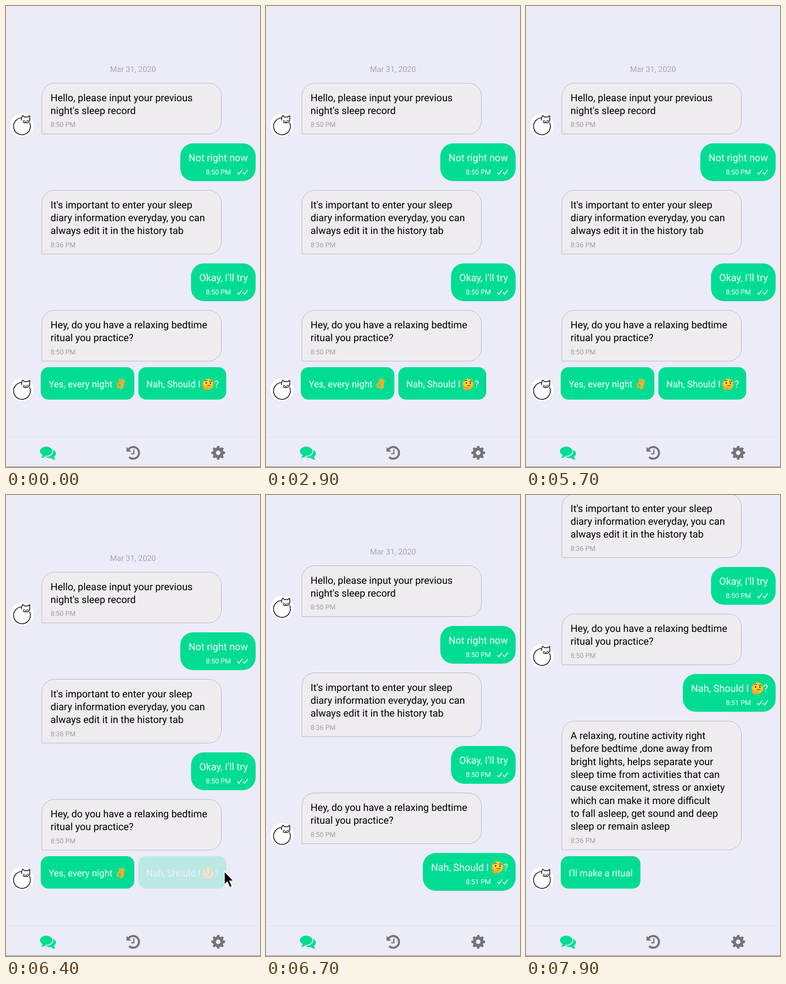
An HTML page that plays this animation: 556x1007 px, repeating every 8000 ms.

```html
<!DOCTYPE html>
<html lang="en">
<head>
<meta charset="utf-8">
<title>Sleep chat</title>
<style>
  html, body { margin: 0; width: 100%; height: 100%; overflow: hidden; background: #ecebf8; }
  svg { display: block; width: 556px; height: 1007px; font-family: Roboto, sans-serif; text-rendering: geometricPrecision; }
  .body { font-size: 21.66px; }
  .time { font-size: 14.9px; }
  .option { font-size: 20.3px; }
  .date { font-size: 17.3px; fill: #a6a5ae; }
  .white { fill: #f8fcff; }
  .grey { fill: #a09fa3; }

  .log, .ask, .sent, .advice, .press, .cursor { animation: 8s step-end infinite; }
  .log { animation-name: log; }
  .ask { animation-name: ask; }
  .sent { animation-name: sent; }
  .advice { animation-name: advice; }
  .press { animation-name: press; }
  .cursor { animation-name: cursor; }

  /* 80% press, 81.25% reply sent, 85% advice arrives */
  @keyframes log {
    0% { transform: translateY(0); }
    81.25% { transform: translateY(-14px); }
    85%, 100% { transform: translateY(-405px); }
  }
  @keyframes ask { 0% { visibility: visible; } 81.25%, 100% { visibility: hidden; } }
  @keyframes sent { 0% { visibility: hidden; } 81.25%, 100% { visibility: visible; } }
  @keyframes advice { 0% { visibility: hidden; } 85%, 100% { visibility: visible; } }
  @keyframes press { 0% { opacity: 1; } 80%, 100% { opacity: .2; } }
  @keyframes cursor { 0% { visibility: hidden; } 80% { visibility: visible; } 81.25%, 100% { visibility: hidden; } }
</style>
</head>
<body>
<svg viewBox="0 0 556 1007">
  <defs>
    <g id="cat">
      <circle r="25.6" fill="#fff"/>
      <g fill="none" stroke="#111" stroke-width="1.7" stroke-linecap="round" stroke-linejoin="round">
        <path d="M-1-15.500A18.400 18.400 0 1 0 16.800-4.500"/>
        <path d="M-1-11C-1-15-.2-18.500 1.500-20.800L5.500-17.300Q9-18 12-17.300L16.700-20.300Q17.800-14 16.800-9.500C15-4.500 7-3.500 2.500-6.500"/>
        <path d="M2.500-9.800q2 1.800 4 .3M10.500-9.500q2.200 1.200 3.800-.5M7.500-7.300l1 .6 1-.8" stroke-width="1.200"/>
      </g>
    </g>
    <radialGradient id="skin" cy=".4">
      <stop offset=".5" stop-color="#fdd835"/>
      <stop offset="1" stop-color="#fbb52a"/>
    </radialGradient>
    <g id="think">
      <circle r="12" fill="url(#skin)"/>
      <g fill="none" stroke="#5b4224" stroke-width="1.500" stroke-linecap="round">
        <path d="M-7.500-7Q-5-9.500-2-7.500M3-6Q6-7.500 8.500-5.500M-1.500 3.500Q2 2 5.500 3.800"/>
      </g>
      <g fill="#48351f">
        <ellipse cx="-4" cy="-2.500" rx="1.500" ry="2"/>
        <ellipse cx="5" cy="-2" rx="1.500" ry="2"/>
      </g>
      <path d="M-10.500 5q1.500-1.500 2.500.5l1.500 2L1 5.800q2 .2 1 1.900L-1.500 9q1 3-3 4-4.500.2-6-3Z" fill="#fba72c" stroke="#e88f1c" stroke-width=".6"/>
    </g>
    <g id="okay" fill="none" stroke-linecap="round">
      <g stroke="#fbb02c" stroke-width="3.700">
        <path d="M-1-3L-2.500-9M2.500-3L2.500-10M5.500-1L7-7.500"/>
        <path d="M4 0Q7 7 1 10"/>
        <ellipse cx="-2.500" cy="3" rx="4.500" ry="4.700"/>
      </g>
      <path d="M.7-5L.3-2M4.500-4L4.200-1M-4.500 8.500Q0 10 2.500 6" stroke="#e08c1e" stroke-width=".8"/>
    </g>
  </defs>

  <rect width="556" height="1007" fill="#ecebf8"/>
  <g id="log" class="log"></g>
  <g id="ask" class="ask"></g>
  <g id="advice" class="advice"></g>

  <path class="cursor" d="M478 822.500V851l6.500-6 5.300 12 5-2.200-5.300-11.800h8.500Z" fill="#000" stroke="#fff" stroke-width="1.500"/>

  <path d="M0 941.500H556" stroke="#e0dfe9"/>
  <g fill="#00dd93">
    <ellipse cx="95.600" cy="977.500" rx="13.700" ry="10"/>
    <path d="M105 983Q105.500 989 108.500 991.300Q102 991.800 97 986Z"/>
    <ellipse cx="88" cy="972.500" rx="13.700" ry="10" stroke="#ecebf8" stroke-width="4" paint-order="stroke"/>
    <path d="M80 979Q80 984.500 76.500 987Q83 987.200 88 982Z"/>
  </g>
  <g fill="none" stroke="#747474" stroke-width="4.400">
    <path d="M268.500 968A12.800 12.800 0 1 1 269.500 985.300"/>
    <path d="M279.800 968.500V978H273.800" stroke-width="2.600"/>
    <path d="M263.800 963V973.500H274.300Z" fill="#747474" stroke="none"/>
  </g>
  <g id="gear" transform="translate(464.500 976)" fill="#747474"></g>
  <path d="M0 1006.500H556" stroke="#77767d"/>
</svg>
<script>
  const GREEN = '#00dd93';
  const byId = id => document.getElementById(id);
  const text = (x, y, cls, str, anchor = 'start') =>
    `<text x="${x}" y="${y}" class="${cls}" text-anchor="${anchor}">${str}</text>`;
  const use = (id, x, y, scale = 1) =>
    `<use href="#${id}" transform="translate(${x} ${y}) scale(${scale})"/>`;
  const box = (x, y, w, h, r) =>
    `<rect x="${x}" y="${y}" width="${w}" height="${h}" rx="${r}" fill="${GREEN}"/>`;
  const group = (cls, content) => `<g class="${cls}">${content}</g>`;

  function botBubble(top, time, lines) {
    const lineHeight = 28.35;
    const h = 111 + (lines.length - 2) * lineHeight;
    const shape = `M78.5 ${top + h}v${28 - h}a28 28 0 0 1 28-28h337a28 28 0 0 1 28 28v${h - 56}a28 28 0 0 1-28 28Z`;
    return `<path d="${shape}" fill="#eeecee" stroke="#b2b0b6"/>` +
      lines.map((line, i) => text(97.6, top + 39 + i * lineHeight, 'body', line)).join('') +
      text(97.4, top + h - 15.3, 'time grey', time);
  }

  function userBubble(left, top, time, message, extra = '') {
    const tick = x => `M${x} ${top + 63.5}l3.300 4 7.200-9.500`;
    return box(left, top, 546.5 - left, 82.5, 28) +
      text(left + 18, top + 38.8, 'body white', message) + extra +
      text(437.4, top + 67.7, 'time white', time) +
      `<path d="${tick(506.5)}${tick(518.8)}" fill="none" stroke="#f8fcff" stroke-width="1.800"/>`;
  }

  const option = (x, w, label) => box(x, 789, w, 70.7, 17) + text(x + 17.4, 833, 'option white', label);

  byId('log').innerHTML =
    text(278, 144, 'date', 'Mar 31, 2020', 'middle') +
    botBubble(168.5, '8:50 PM', ['Hello, please input your previous', "night's sleep record"]) +
    use('cat', 35, 260) +
    userBubble(381.5, 300, '8:50 PM', 'Not right now') +
    botBubble(402.5, '8:36 PM', ['It\'s important to enter your sleep', 'diary information everyday, you can', 'always edit it in the history tab']) +
    userBubble(405, 562.2, '8:50 PM', "Okay, I'll try") +
    botBubble(664.8, '8:50 PM', ['Hey, do you have a relaxing bedtime', 'ritual you practice?']) +
    group('sent',
      use('cat', 35, 756) +
      userBubble(343.3, 796, '8:51 PM', 'Nah, Should I',
        use('think', 506.8, 826.8, 1.05) + text(529.8, 834.8, 'body white', '?', 'end'))) +
    group('advice', botBubble(898.9, '8:36 PM', [
      'A relaxing, routine activity right',
      'before bedtime ,done away from',
      'bright lights, helps separate your',
      'sleep time from activities that can',
      'cause excitement, stress or anxiety',
      'which can make it more difficult',
      'to fall asleep, get sound and deep',
      'sleep or remain asleep']));

  byId('ask').innerHTML =
    use('cat', 35, 838) +
    option(76, 205, 'Yes, every night') + use('okay', 251, 825.5) +
    group('press',
      option(289.7, 192.5, 'Nah, Should I') + use('think', 442.3, 826) +
      text(465.8, 833, 'option white', '?', 'end'));

  byId('advice').innerHTML = use('cat', 35, 838) + option(76, 174.5, "I'll make a ritual");

  const teeth = Array.from({ length: 8 }, (_, i) =>
    `<path d="M-3.300-9L-2.400-15H2.400L3.300-9Z" transform="rotate(${i * 45})"/>`).join('');
  byId('gear').innerHTML = teeth +
    '<circle r="8.400" fill="none" stroke="#747474" stroke-width="6.800"/>';
</script>
</body>
</html>
```
